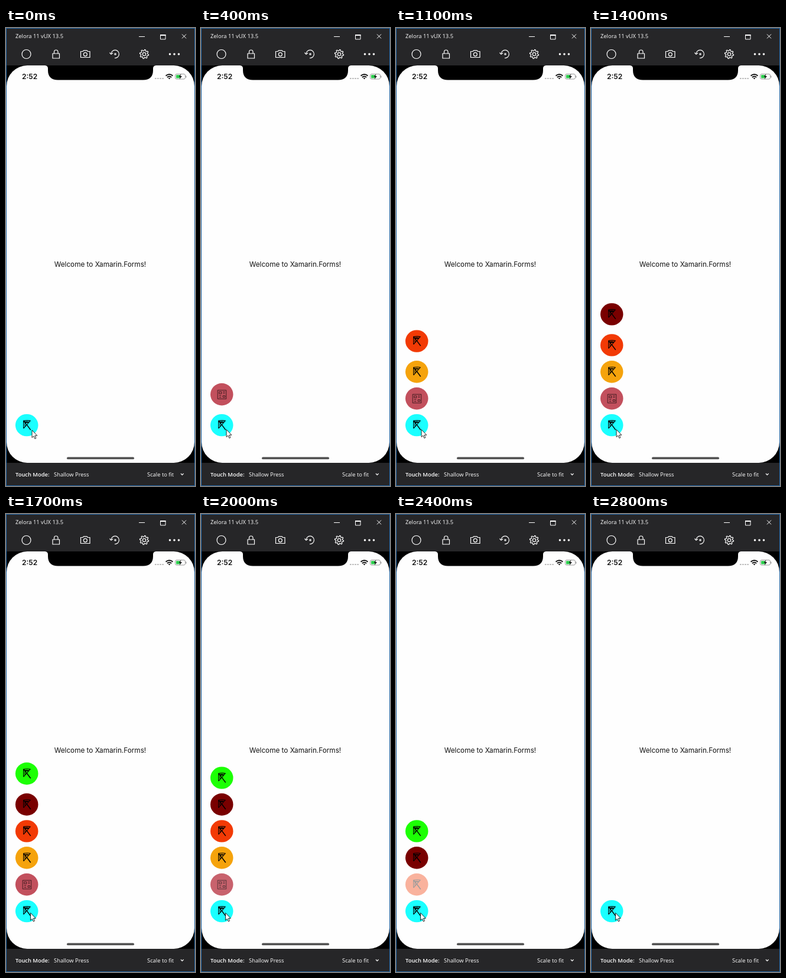
Animation of 320 by 771 pixels, one loop 2900 ms. Source, as an HTML page:

```html
<!DOCTYPE html>
<html lang="en">
<head>
<meta charset="utf-8">
<title>Floating menu</title>
<style>
  html, body { margin: 0; width: 100%; height: 100%; overflow: hidden; background: #262628; }
  svg { display: block; width: 100vw; height: 100vh; }
  .ui { font: 9.4px "Open Sans", "Noto Sans", sans-serif; fill: #fff; }
  .screen { font: 11.75px Inter, sans-serif; fill: #111; }
  .line { fill: none; stroke: #fff; stroke-width: 1.2; }
  .bold { font-weight: 600; }
</style>
</head>
<body>
<svg viewBox="0 0 320 771">
  <defs>
    <g id="umbrella" fill="none" stroke="#000" stroke-width="1.1" stroke-linejoin="round">
      <path d="M-5.5 5.5V-7.5Q1-8.5 6-7.5L-5.5 5.5M-5.5-5Q0-6.5 4-5M-3 2V-4.5L2-4.5M-5.5-7.5L-1-2"/>
      <path d="M-1-2L6.5 8" stroke-width="1.5"/>
    </g>
    <g id="card" fill="none" stroke="#000" stroke-opacity=".65">
      <path d="M-7-7H7.5V7.5H-7ZM-4.5-4.5H-.5V-1H-4.5ZM2-4.5H5.5M2-2H5.5M-4.5 2H-1M-4.5 5H-1M2 2H5.5V5H2Z"/>
    </g>
  </defs>

  <rect width="320" height="771" fill="#262628"/>
  <rect y="63" width="320" height="669"/>
  <rect x="1" y="63" width="318" height="669" rx="35" fill="#fefefe"/>
  <path d="M66 63Q71 63.5 71 68V71Q71 87.5 88 87.5H232Q249 87.5 249 71V68Q249 63.5 254 63Z"/>

  <!-- window bar -->
  <text class="ui" x="16" y="17">Zelora 11 vUX 13.5</text>
  <g class="line">
    <path d="M225 14.5H235M298 10.5L305 17.5M305 10.5L298 17.5M261.5 11.5H270V19H261.5Z" stroke-width="1"/>
    <path d="M261 12H270.5" stroke-width="2"/>
    <circle cx="34.5" cy="44" r="7.5"/>
    <path d="M79 43H90.5V51H79ZM81.5 43V40.5Q81.5 37 84.7 37T88 40.5V43"/>
    <path d="M126.5 39.5H130L131.5 37.8H137L138.5 39.5H142V49.5H126.5Z"/>
    <circle cx="134.3" cy="44.3" r="3"/>
    <path d="M178 44A6.7 6.7 0 1 1 184 50.5M175.5 41.5L178 44.3L181 42"/>
    <circle cx="185" cy="44" r="1.2"/>
    <path id="gear"/>
    <circle cx="234" cy="44" r="2.7"/>
  </g>
  <path d="M277.5 44H293" stroke="#fff" stroke-width="3.6" stroke-linecap="round" stroke-dasharray="0 7.5"/>

  <!-- phone status -->
  <text class="screen bold" x="27" y="86" style="font-size:12px">2:52</text>
  <path d="M252 85H267" stroke="#bbb" stroke-width="2" stroke-dasharray="2.6 1.5"/>
  <path d="M270.5 80.5Q276.5 75.5 282.5 80.5M272.8 83Q276.5 80 280.2 83" fill="none" stroke="#111" stroke-width="1.8"/>
  <path d="M274.5 84L276.5 86.5L278.5 84Z" fill="#111"/>
  <rect x="286.5" y="77.5" width="17" height="8.5" rx="2.5" fill="#fff" stroke="#999"/>
  <rect x="288" y="79" width="7" height="5.5" rx="1" fill="#2fd04f"/>
  <path d="M305 80.5V83.5" stroke="#999" stroke-width="1.2"/>
  <path d="M296.5 77L292.5 82.3H295L293.7 86.5L298 81H295.3Z" fill="#111"/>
  <text class="screen" x="159.5" y="401.5" text-anchor="middle">Welcome to Xamarin.Forms!</text>
  <rect x="103" y="722.3" width="114" height="3.8" rx="1.9" fill="#555"/>

  <g id="menu"></g>
  <path id="cursor" d="M0 0V12.5L2.8 10L4.9 14.5L6.9 13.5L4.9 9.2H8.8Z" fill="#fff" stroke="#111" stroke-width=".9"/>

  <!-- bottom bar -->
  <text class="ui bold" x="16" y="755">Touch Mode:</text>
  <text class="ui" x="81" y="755">Shallow Press</text>
  <text class="ui" x="239" y="755">Scale to fit</text>
  <path class="line" d="M296 750L298.3 752.3L300.6 750"/>
  <rect x=".5" y=".5" width="319" height="770" fill="none" stroke="#2468a8"/>
</svg>
<script>
const LOOP = 2900, LEFT = 35.2, BASE = 668.6, GAP = 44.9;
const OPEN = 250, STEP = 320;
const colors = ['#c2505d', '#f5a30c', '#f23a05', '#790000', '#1cff04'];
const closeAt = [1980, 2175, 2315, 2455, 2595, 2735];
const $ = id => document.getElementById(id);
const clamp = v => Math.max(0, Math.min(1, v));
const place = (el, x, y) => el.setAttribute('transform', `translate(${x} ${y})`);

function addButton(color, icon) {
  const g = document.createElementNS('http://www.w3.org/2000/svg', 'g');
  g.innerHTML = `<ellipse rx="19.3" ry="18.7" fill="${color}"/><use href="#${icon}"/>`;
  $('menu').append(g);
  return g;
}

const items = colors.map((c, i) => addButton(c, i ? 'umbrella' : 'card'));
place(addButton('#1affff', 'umbrella'), LEFT, BASE);

const teeth = Array.from({ length: 32 }, (_, i) => {
  const a = (i + .5) * Math.PI / 16, r = i % 4 < 2 ? 7.6 : 5.6;
  return `${234 + r * Math.cos(a)} ${44 + r * Math.sin(a)}`;
});
$('gear').setAttribute('d', `M${teeth.join('L')}Z`);

function draw(t) {
  const removed = closeAt.slice(1).filter(end => t >= end).length;
  items.forEach((item, i) => {
    // each button fades in, hops up and settles; the lowest one fades out first
    const p = clamp((t - OPEN - i * STEP) / STEP);
    const fade = clamp((t - closeAt[i]) / (closeAt[i + 1] - closeAt[i]));
    const hop = 7.2 * Math.sin(Math.PI * p ** 1.2);
    place(item, LEFT, BASE - GAP * (i + 1 - removed) - hop);
    item.setAttribute('opacity', clamp(p * 3) * (1 - fade));
  });
  const [x, y] = t < 100 ? [44, 677] : t < 1600 ? [43, 676] : [41.5, 671.5];
  place($('cursor'), x, y);
}

const start = performance.now();
function tick() {
  draw((performance.now() - start) % LOOP);
  requestAnimationFrame(tick);
}
tick();
</script>
</body>
</html>
```
